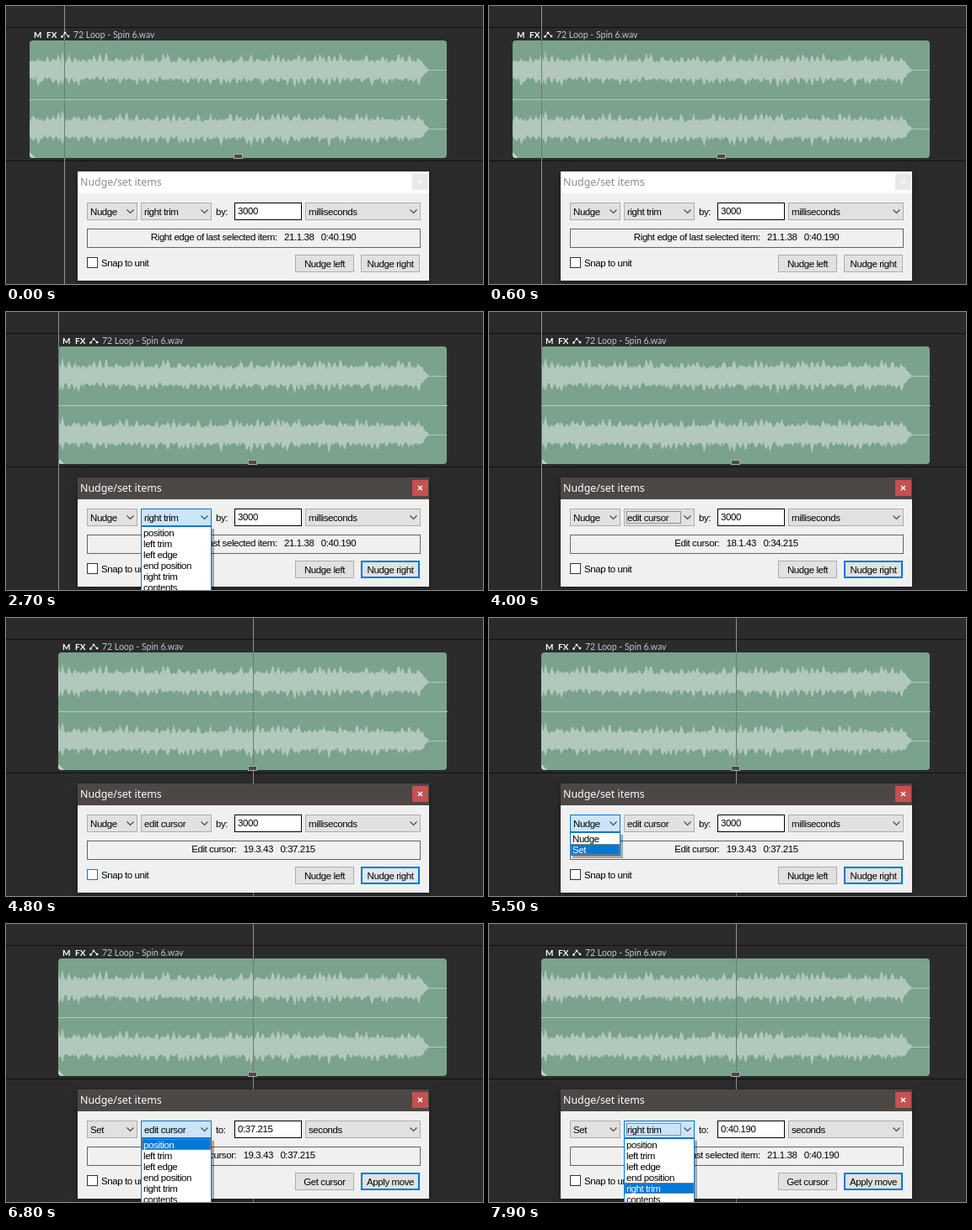
Animation, 566 px wide and 331 px high, one loop 8000 ms. Source, as an HTML page with a canvas:

```html
<!DOCTYPE html>
<html lang="en">
<head>
<meta charset="utf-8">
<title>Nudge/set items</title>
<style>
  html, body { margin: 0; width: 100%; height: 100%; overflow: hidden; background: #2b2b2b; }
  canvas { display: block; }
</style>
</head>
<body>
<canvas id="stage" width="566" height="331"></canvas>
<script>
const ctx = document.getElementById('stage').getContext('2d');
const LOOP = 8000, STEP = 100;
const BLUE = '#0078d7';
const UI = '11.5px "Liberation Sans", Arial, sans-serif';
const NORMAL = ['#e1e1e1', '#adadad'], HOVER = ['#e5f1fb', BLUE], PRESSED = ['#cce4f7', BLUE];
const TARGETS = ['position', 'left trim', 'left edge', 'end position', 'right trim', 'contents'];

const ramp = (t, from, to) => Math.min(1, Math.max(0, (t - from) / (to - from)));
const pulse = (t, a, b, c, d) => ramp(t, a, b) * (1 - ramp(t, c, d));
const within = (t, from, to) => t >= from && t < to;
const noise = n => { const v = Math.sin(n * 127.1 + 3.7) * 43758.5453; return v - Math.floor(v); };

function rect(x, y, w, h, fill) {
  ctx.fillStyle = fill;
  ctx.fillRect(x, y, w, h);
}

// Fill and border do not overlap, so the box can be blended over another.
function box(x, y, w, h, fill, border, line = 1) {
  rect(x + line, y + line, w - 2 * line, h - 2 * line, fill);
  ctx.strokeStyle = border;
  ctx.lineWidth = line;
  ctx.strokeRect(x + line / 2, y + line / 2, w - line, h - line);
}

function path(points, color, width = 1) {
  ctx.beginPath();
  points.forEach(([x, y]) => ctx.lineTo(x, y));
  ctx.strokeStyle = color;
  ctx.lineWidth = width;
  ctx.stroke();
}

function text(str, x, y, color = '#000', font = UI, align = 'left') {
  ctx.font = font;
  ctx.letterSpacing = font === UI ? '-0.42px' : '0px';
  ctx.textAlign = align;
  ctx.fillStyle = color;
  ctx.fillText(str, x, y);
}

function dotted(x, y, w, h, color) {
  ctx.setLineDash([1, 1]);
  ctx.strokeStyle = color;
  ctx.lineWidth = 1;
  ctx.strokeRect(x + .5, y + .5, w - 1, h - 1);
  ctx.setLineDash([]);
}

// Control face: normal style with a hover or pressed style blended over it.
function face(x, y, w, h, heat, pressed, line = 1) {
  box(x, y, w, h, NORMAL[0], line > 1 ? BLUE : NORMAL[1], line);
  ctx.globalAlpha = pressed ? 1 : heat;
  box(x, y, w, h, ...(pressed ? PRESSED : HOVER), line);
  ctx.globalAlpha = 1;
}

function combo(x, w, label, heat = 0, pressed = false) {
  face(x, 234, w, 21, heat, pressed);
  text(label, x + 4, 249);
  const cx = x + w - 8.5;
  path([[cx - 4, 242.5], [cx, 246.5], [cx + 4, 242.5]], '#444', 1.1);
}

function button(x, label, heat, pressed, isDefault) {
  face(x, 296, 70, 21, heat, pressed, isDefault ? 2 : 1);
  text(label, x + 35, 311, '#000', UI, 'center');
}

function dropdown(x, w, items, open, selected) {
  if (open <= 0) return;
  const full = items.length * 13 + 2, h = full * open;
  rect(x + 3, 258, w, h, 'rgba(0,0,0,.3)');
  ctx.save();
  ctx.beginPath();
  ctx.rect(x, 255, w, h);
  ctx.clip();
  box(x, 255, w, full, '#fff', BLUE);
  items.forEach((item, i) => {
    const y = 256 + i * 13;
    if (i === selected) {
      rect(x + 1, y, w - 2, 13, BLUE);
      dotted(x + 1, y, w - 2, 13, '#ff8728');
    }
    text(item, x + 3, y + 11, i === selected ? '#fff' : '#000');
  });
  ctx.restore();
}

function waveHeight(x, seed) {
  const beat = Math.round(x / 6.2);
  const peak = (beat + .5 * noise(beat + 300) - .25) * 6.2;
  const spike = Math.max(0, 1 - Math.abs(x - peak) / 3) * (2 + 10 * noise(beat + seed) ** 2);
  return (8 + 3.5 * noise(x + seed * 3) + spike) * ramp(x, 502, 492);
}

function waveform(mid, seed) {
  ctx.beginPath();
  for (let x = 28; x <= 502; x++) ctx.lineTo(x, mid - waveHeight(x, seed));
  for (let x = 502; x >= 28; x--) ctx.lineTo(x, mid + waveHeight(x, seed + 50));
  ctx.fillStyle = '#b2c8bc';
  ctx.fill();
  rect(500, mid, 23, 1, '#b2c8bc');
}

function drawTrack(t) {
  const left = t < 1000 ? 28 : 62;
  const cursor = t < 500 ? 69 : t < 4200 ? 62 : 293;
  rect(0, 0, 566, 331, '#2b2b2b');
  rect(0, 25, 566, 1, '#101010');
  rect(0, 184, 566, 1, '#101010');
  rect(cursor, 0, 1, 331, '#949494');

  ctx.save();
  ctx.beginPath();
  ctx.roundRect(left, 41, 523 - left, 140, 4);
  ctx.clip();
  rect(left, 41, 523 - left, 140, '#7aa28d');
  waveform(76, 1);
  waveform(146, 9);
  ctx.beginPath();
  ctx.moveTo(left, 174);
  ctx.lineTo(left + 8, 182);
  ctx.lineTo(left, 182);
  ctx.fillStyle = '#c4d3ca';
  ctx.fill();
  rect(cursor, 41, 1, 140, '#6b7c72');
  ctx.restore();
  rect(left, 111, 524 - left, 1, '#b2c8bc');

  const mid = Math.floor((left + 523) / 2);
  box(mid - 5, 176, 11, 6, '#4a4a4a', '#a4b0a9');

  const small = 'bold 10px Lato, sans-serif';
  text('M', left + 5, 38, '#fff', small);
  text('FX', left + 20, 38, '#fff', small);
  const nodes = [[38.5, 36.5], [42, 32], [46, 36]].map(([x, y]) => [left + x, y]);
  path(nodes, '#fff');
  nodes.forEach(([x, y]) => rect(x - 1.2, y - 1.2, 2.4, 2.4, '#fff'));
  text('72 Loop - Spin 6.wav', left + 52, 38, '#bccad4', '10.5px Lato, sans-serif');
}

function drawDialog(t) {
  const active = t >= 2300, setMode = t >= 6200;
  const target = within(t, 3500, 7900) ? 'edit cursor' : 'right trim';
  const status = target === 'right trim' ? 'Right edge of last selected item:   21.1.38   0:40.190'
    : t < 4200 ? 'Edit cursor:   18.1.43   0:34.215' : 'Edit cursor:   19.3.43   0:37.215';
  const value = !setMode ? '3000' : t < 7900 ? '0:37.215' : '0:40.190';

  ctx.save();
  ctx.shadowColor = 'rgba(0,0,0,.35)';
  ctx.shadowBlur = 9;
  ctx.shadowOffsetY = 2;
  rect(85, 198, 417, 129, '#f0f0f0');
  ctx.restore();
  rect(85, 197, 417, 26, active ? '#4c4846' : '#fff');
  text('Nudge/set items', 88, 214, active ? '#fff' : '#8c8c8c', '12.4px "Noto Sans", sans-serif');
  rect(482, 200, 19, 19, active ? '#c75050' : '#e8e8e8');
  const cross = active ? '#fff' : '#f8f8f8';
  path([[489, 207], [494, 212]], cross, 1.4);
  path([[494, 207], [489, 212]], cross, 1.4);

  combo(96, 60, setMode ? 'Set' : 'Nudge',
    pulse(t, 1400, 1700, 1900, 2300) + pulse(t, 5000, 5300, 6100, 6500), within(t, 5300, 6200));
  combo(160, 84, target,
    pulse(t, 1700, 2100, 3400, 3800) + ramp(t, 6400, 6700), within(t, 2300, 3500) || t >= 6600);
  if (within(t, 3500, 4200) || t >= 7900) dotted(163, 237, 65, 15, '#444');
  text(setMode ? 'to:' : 'by:', 249, 249);
  box(271, 234, 80, 21, '#fff', '#000');
  text(value, 275, 248);
  combo(355, 137, setMode ? 'seconds' : 'milliseconds');

  box(96, 265, 396, 23, '#f0f0f0', '#646464');
  text(status, 293.5, 279, '#000', UI, 'center');

  box(96, 299, 13, 13, '#fff', within(t, 4800, 5100) ? BLUE : '#333');
  text('Snap to unit', 113, 310);
  button(343, setMode ? 'Get cursor' : 'Nudge left', 0, false, false);
  button(421, setMode ? 'Apply move' : 'Nudge right',
    pulse(t, 4000, 4200, 4600, 4900), within(t, 4200, 4400), active);

  const pick = t < 6800 ? -1 : t < 6900 ? 0 : t < 7100 ? 2 : t < 7200 ? 3 : 4;
  dropdown(96, 60, ['Nudge', 'Set'], t < 6200 ? ramp(t, 5200, 5400) : 0, t < 5500 ? 0 : 1);
  dropdown(160, 84, TARGETS, t < 3500 ? ramp(t, 2300, 2600) : ramp(t, 6500, 6800), pick);
}

function frame(now) {
  const t = Math.floor(now % LOOP / STEP) * STEP;
  drawTrack(t);
  drawDialog(t);
  requestAnimationFrame(frame);
}
requestAnimationFrame(frame);
</script>
</body>
</html>
```
